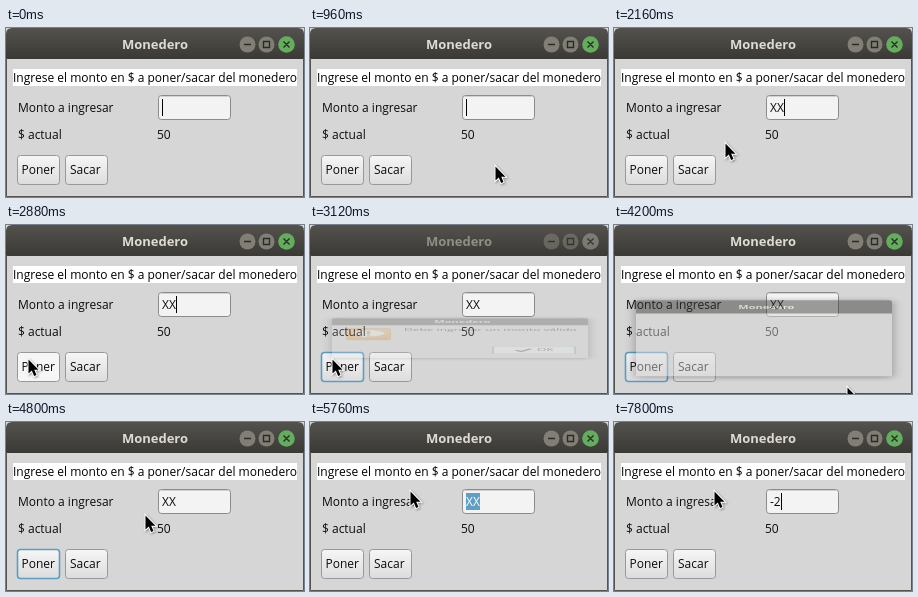
Write an HTML page that moves like this. It is 298 px wide and 169 px high and loops after 8000 ms.

```html
<!DOCTYPE html>
<html lang="es">
<head>
<meta charset="utf-8">
<title>Monedero</title>
<style>
  html, body { margin: 0; width: 100%; height: 100%; overflow: hidden; background: #d6d6d6; }
  svg { display: block; width: 298px; height: 169px; }
  text { font: 12px "Open Sans", "Noto Sans", sans-serif; fill: #0c0c0c; white-space: pre; }
  .title { font-weight: 700; font-size: 13px; text-anchor: middle; fill: #dfdbd2; }
  .small { font-size: 11px; }
  .button { fill: url(#face); stroke: #989898; }
  .button.hover { fill: #f6f6f6; }
  .button.focus { stroke: #5b9dc3; stroke-width: 1.6; }
  #close { fill: #62ae5c; }
  #main.inactive .title { fill: #918e86; }
  #main.inactive .control { opacity: .6; }
  #main.inactive #close { fill: #a09d94; }
  #dialog { filter: drop-shadow(0 2px 6px rgba(0, 0, 0, .7)); }
  #arrow { filter: drop-shadow(1px 1px 1px rgba(0, 0, 0, .35)); }
</style>
</head>
<body>
<svg viewBox="0 0 298 169">
  <defs>
    <linearGradient id="bar" x2="0" y2="1">
      <stop stop-color="#53524d"/><stop offset="1" stop-color="#3a3935"/>
    </linearGradient>
    <linearGradient id="face" x2="0" y2="1">
      <stop stop-color="#f6f6f6"/><stop offset="1" stop-color="#dcdcdc"/>
    </linearGradient>
    <linearGradient id="orange" x2="0" y2="1">
      <stop stop-color="#f6b64c"/><stop offset="1" stop-color="#e08a1a"/>
    </linearGradient>
  </defs>

  <g id="main">
    <rect width="298" height="169" fill="#d6d6d6"/>
    <path d="M0 31V6Q0 0 6 0H292Q298 0 298 6V31Z" fill="url(#bar)"/>
    <path d="M.5 30V168.5H297.5V30" fill="none" stroke="#55544f"/>
    <text class="title" x="149" y="21">Monedero</text>
    <g class="control">
      <g fill="#817e75">
        <circle cx="241.5" cy="16.5" r="8"/>
        <circle cx="260.5" cy="16.5" r="8"/>
      </g>
      <circle id="close" cx="280.5" cy="16.5" r="8.3"/>
      <path d="M238 16.5H245M257.5 13.5H263.5V19.5H257.5ZM277.5 13.5L283.5 19.5M283.5 13.5L277.5 19.5" fill="none" stroke="#2b2a27" stroke-width="1.4"/>
    </g>

    <rect x="7" y="41" width="284" height="17" fill="#fff"/>
    <text x="7" y="54" style="fill:#000">Ingrese el monto en $ a poner/sacar del monedero</text>
    <text x="12" y="84">Monto a ingresar</text>
    <text x="12" y="111">$ actual</text>
    <text x="151" y="111">50</text>

    <rect x="152.5" y="67.5" width="72" height="24" rx="3" fill="#f3f3f3" stroke="#8b8b8b"/>
    <path d="M154 68.5H223" stroke="#d2d2d2"/>
    <rect id="selection" x="156" y="71" width="14" height="17" fill="#5f9fc5"/>
    <text id="entry" x="156" y="84"></text>
    <rect id="caret" y="71" width="1" height="17" fill="#000"/>

    <rect id="poner" class="button" x="11.5" y="127.5" width="42" height="29" rx="3"/>
    <text x="15.5" y="146">Poner</text>
    <rect class="button" x="59.5" y="127.5" width="42" height="29" rx="3"/>
    <text x="64" y="146">Sacar</text>
  </g>

  <g id="dialog">
    <rect x="22" y="34" width="256" height="159" fill="#d6d6d6"/>
    <path d="M22 62V37Q22 34 25 34H275Q278 34 278 37V62Z" fill="#3b3a37"/>
    <text class="title small" x="152.3" y="52">Monedero</text>
    <g id="message">
      <rect x="36.5" y="75.5" width="44" height="44" rx="3" fill="url(#orange)" stroke="#b87a26"/>
      <path d="M58.5 80C68 80 75 86 75 94S68 108 58.5 108L51 113L51.5 106.500C46 104 42 100 42 94S49 80 58.500 80Z" fill="#fdf8ee" stroke="#cf8420"/>
      <path d="M58.500 86V97M58.500 100V103.500" stroke="#c8791a" stroke-width="3.400"/>
      <text x="94" y="86">Debe ingresar un monto válido</text>
      <rect class="button hover focus" x="183" y="146.500" width="82" height="30" rx="3"/>
      <path d="M206 162L211 167L221 156" fill="none" stroke="#3a3a3a" stroke-width="4"/>
      <text x="227" y="167">OK</text>
    </g>
  </g>

  <path id="arrow" d="M.5 .5V14.500L3.800 11.500L6.100 17L8.500 15.900L6.200 10.800H10.500Z" fill="#000" stroke="#fff" stroke-width="2" paint-order="stroke"/>
  <g id="beam" fill="none">
    <path d="M-3.500 -8.500Q0 -8.500 0 -6V6Q0 8.500 -3.500 8.500M3.500 -8.500Q0 -8.500 0 -6M0 6Q0 8.500 3.500 8.500" stroke="#fff" stroke-width="2.400"/>
    <path d="M-3.500 -8.500Q0 -8.500 0 -6V6Q0 8.500 -3.500 8.500M3.500 -8.500Q0 -8.500 0 -6M0 6Q0 8.500 3.500 8.500" stroke="#000"/>
  </g>
</svg>
<script>
const LOOP = 8000, TICK = 120, CLOSING = 3840;
const $ = id => document.getElementById(id);
const clamp = v => Math.max(0, Math.min(1, v));
const show = (id, on) => $(id).style.display = on ? '' : 'none';

// time, x, y of the pointer tip
const pointerPath = [
  [0, 230, 185], [120, 217, 162], [480, 190, 141], [600, 185, 138], [2040, 185, 138],
  [2160, 111, 115], [2400, 52, 130], [2640, 24, 135], [2880, 22, 134], [3120, 22, 134],
  [3600, 184, 142], [3720, 215, 155], [4200, 233, 162], [4560, 118, 107],
  [5160, 171, 71], [5400, 171, 71], [5760, 100, 69], [LOOP, 100, 69]
];
// time, entry content
const typing = [[0, ''], [1560, 'X'], [1680, 'XX'], [6720, ''], [7440, '-'], [7800, '-2']];

function pointerAt(t) {
  const i = pointerPath.findIndex(p => p[0] > t);
  const [t0, x0, y0] = pointerPath[i - 1], [t1, x1, y1] = pointerPath[i];
  const k = (t - t0) / (t1 - t0);
  return [x0 + (x1 - x0) * k, y0 + (y1 - y0) * k];
}

function render(t) {
  const [typedAt, value] = typing.filter(s => s[0] <= t).pop();
  const selected = t >= 5400 && t < 6720;
  const editing = t < 3000 || t >= 6720;
  $('entry').textContent = value;
  $('entry').style.fill = selected ? '#fff' : '';
  show('selection', selected);
  $('caret').setAttribute('x', 156 + Math.round(value ? $('entry').getComputedTextLength() : 0));
  show('caret', editing && (t - typedAt) % 960 < 600);

  // the dialog unfolds and folds around its horizontal middle line; it folds away empty
  const open = t < CLOSING ? clamp((t - 3000) / 480) : clamp(1 - (t - CLOSING) / 690);
  show('dialog', open > 0);
  show('message', t < CLOSING);
  $('dialog').setAttribute('transform', `translate(0 ${113 * (1 - open)}) scale(1 ${open})`);
  $('dialog').setAttribute('opacity', open);
  $('main').classList.toggle('inactive', t >= 3120 && t < 3960);

  const [x, y] = pointerAt(t);
  $('poner').classList.toggle('hover', open === 0 && x > 11 && x < 54 && y > 127);
  $('poner').classList.toggle('focus', t >= 3000 && t < 5400);
  const overEntry = open === 0 && x > 152 && x < 225 && y > 67 && y < 92;
  for (const id of ['arrow', 'beam']) {
    $(id).setAttribute('transform', `translate(${Math.round(x)} ${Math.round(y)})`);
    show(id, overEntry === (id === 'beam'));
  }
}

const start = performance.now();
function frame() {
  const t = (performance.now() - start) % LOOP;
  render(Math.floor(t / TICK) * TICK);
  requestAnimationFrame(frame);
}
frame();
</script>
</body>
</html>
```
